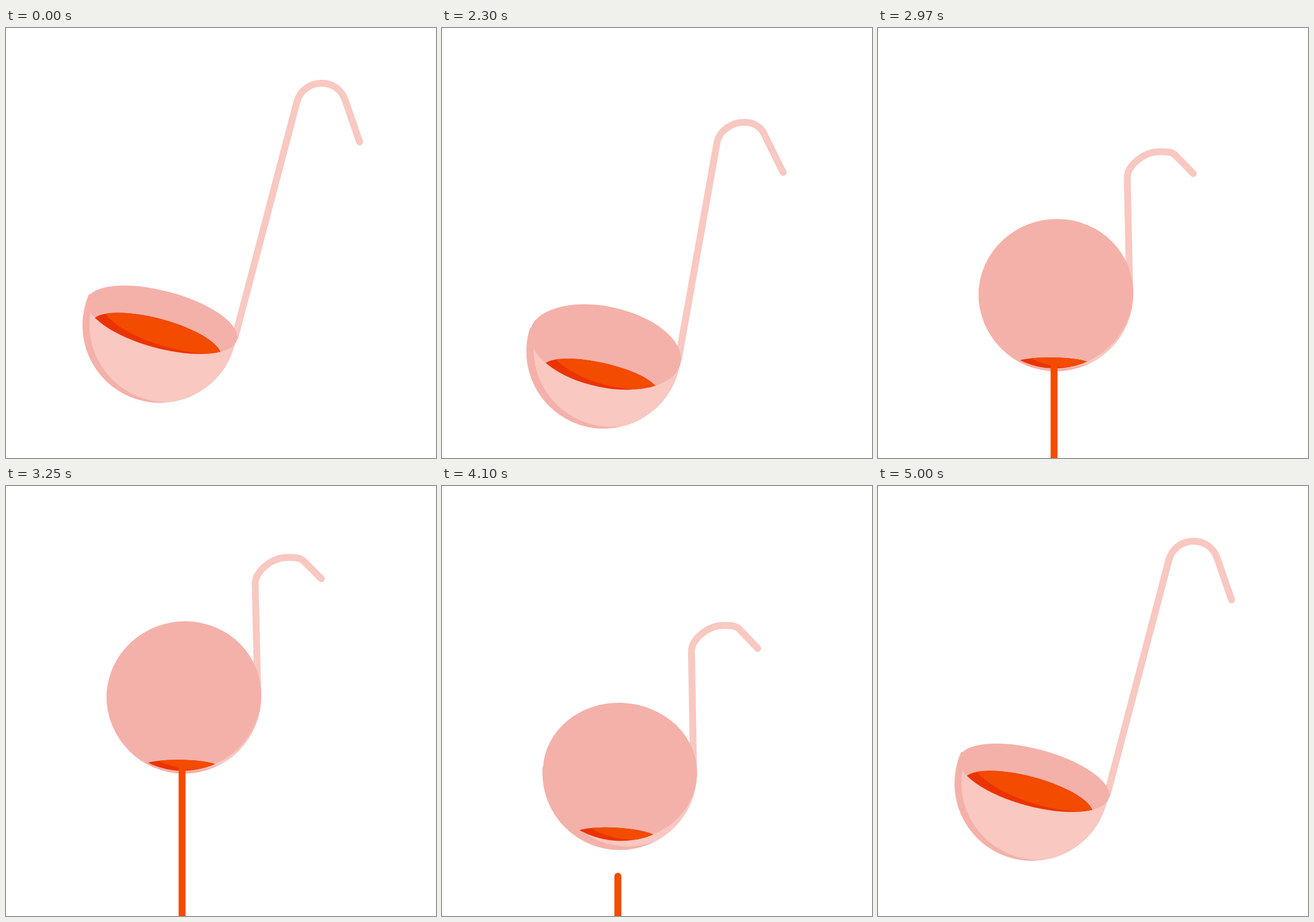
An HTML page with a canvas that plays this animation: 748x748 px, repeating every 5.02 s.

```html
<!DOCTYPE html>
<html lang="en">
<head>
<meta charset="utf-8">
<title>Ladle</title>
<style>
html, body { margin: 0; height: 100%; overflow: hidden; background: #fff; }
canvas { display: block; width: 100vmin; height: 100vmin; }
</style>
</head>
<body>
<canvas width="748" height="748"></canvas>
<script>
const ctx = document.querySelector('canvas').getContext('2d');
const LIGHT = '#f8c8c1', DARK = '#f4b1a9', SOUP = '#f34b00', SOUP_DARK = '#eb3300';
const LOOP = 5020, START = 2000, APEX = 3500, END = 5000;
const POUR = 2420, STOP = 4000;
const FLOW = 0.0076, FALL = 0.0092;
const R = 134.5;

const mix = (a, b, p) => a + (b - a) * p;
const mixAll = (a, b, p) => a.map((v, i) => mix(v, b[i], p));

// Cubic bezier easing with control points (x1, 0) and (x2, 1)
function ease(u, x1 = 1 / 3, x2 = 2 / 3) {
  if (u <= 0) return 0;
  if (u >= 1) return 1;
  let lo = 0, hi = 1, s;
  for (let i = 0; i < 24; i++) {
    s = (lo + hi) / 2;
    const x = 3 * (1 - s) * s * ((1 - s) * x1 + s * x2) + s ** 3;
    if (x < u) lo = s; else hi = s;
  }
  return s * s * (3 - 2 * s);
}

// Ellipses as [ux, uy, vx, vy, cx, cy], relative to the bowl centre
const RIM = [[130.4, 34.9, -12.9, 48.2, 4, -10], [134.5, 2, -4, 130, 0, -0.5]];
const POOL = [[112, 30, -9.3, 34.8, -6.2, 23.8], [66, 1, 0, 11.5, -5, 122]];

// Hook points: x from the bowl centre, y from the top of the hook
const HOOK_X = [[238.5, 243.7, 261.1, 281, 300.9, 316.7, 322.8], [124, 124, 153, 180, 194, 202, 208]];
const HOOK_Y = [[32.6, 13.4, 0, 0, 0, 11.5, 30.4], [46, 24, 0, 0, 0, 0, 6]];

const unit = new Path2D();
unit.arc(0, 0, 1, 0, 7);

function ellipsePath([ux, uy, vx, vy, x, y], dx = 0, dy = 0) {
  const path = new Path2D();
  path.addPath(unit, new DOMMatrix([ux, uy, vx, vy, x + dx, y + dy]));
  return path;
}

function fill(path, colour) {
  ctx.fillStyle = colour;
  ctx.fill(path);
}

function pose(t) {
  const rising = t < APEX;
  const u = Math.max(0, rising ? t - START : END - t) / 1000;
  const lift = rising ? ease(u - 0.5, 0.36, 0.57) : ease(u - 0.5);
  const bottom = u < 0.5 ? mix(652, 721, ease(u * 2)) : mix(721, 471, lift);
  const turn = ease(u, 0.333, 0.37);
  const tilt = rising ? ease(u, 0.333, 0.52) : ease(u / 1.15);
  return {
    x: mix(267.5, 309.5, turn),
    y: bottom - R,
    turn,
    hook: ease(u, 0.333, 0.31),
    drop: ease(u / 1.1, 0.47, 0.62),
    rim: mixAll(...RIM, tilt),
    pool: mixAll(...POOL, tilt)
  };
}

function drawHandle({ turn, hook, drop }) {
  const bend = (turn + drop) / 2;
  const top = mix(-421.5, -241.5, drop);
  const xs = mixAll(...HOOK_X, hook);
  const ys = mixAll(...HOOK_Y, bend).map(y => y + top);
  const curve = i => ctx.bezierCurveTo(xs[i], ys[i], xs[i + 1], ys[i + 1], xs[i + 2], ys[i + 2]);
  ctx.beginPath();
  ctx.moveTo(mix(131, 128.5, turn), mix(20, -1, turn));
  ctx.lineTo(xs[0], ys[0]);
  curve(1);
  curve(4);
  ctx.lineTo(mix(347.5, 239, turn), top + mix(102, 37, bend));
  ctx.strokeStyle = LIGHT;
  ctx.stroke();
}

function drawBowl({ turn, rim, pool }) {
  const bowl = new Path2D();
  bowl.arc(0, 0, R, mix(0.18, 0, turn), mix(3.56, 3.22, turn));
  const lit = new Path2D();
  lit.arc(mix(12, 14, turn), mix(-1.5, -6.5, turn), R, 0, 7);
  fill(bowl, DARK);
  ctx.save();
  ctx.clip(bowl);
  fill(lit, LIGHT);
  ctx.restore();

  const inside = ellipsePath(rim);
  fill(inside, DARK);
  ctx.save();
  ctx.clip(inside);
  const surface = ellipsePath(pool);
  fill(surface, SOUP_DARK);
  ctx.clip(surface);
  fill(ellipsePath(rim, mix(24, 22, turn), mix(0, -2, turn)), SOUP);
  ctx.restore();
}

const lip = p => p.y + p.pool[5] + 6;

function drawStream(t, p) {
  if (t < POUR) return;
  const top = t < STOP ? lip(p) : lip(pose(STOP)) + FALL * (t - STOP) ** 2;
  if (top > 760) return;
  const tip = Math.min(780, lip(p) + FLOW * (t - POUR) ** 2);
  const x = p.x - 3.2;
  ctx.beginPath();
  ctx.moveTo(x, top);
  ctx.lineTo(x, tip);
  ctx.strokeStyle = SOUP;
  ctx.stroke();
}

function draw(t) {
  const p = pose(t);
  ctx.clearRect(0, 0, 748, 748);
  ctx.lineWidth = 12;
  ctx.lineCap = 'round';
  ctx.save();
  ctx.translate(p.x, p.y);
  drawHandle(p);
  drawBowl(p);
  ctx.restore();
  drawStream(t, p);
}

const begin = performance.now();
function frame() {
  draw((performance.now() - begin) % LOOP);
  requestAnimationFrame(frame);
}
frame();
</script>
</body>
</html>
```
